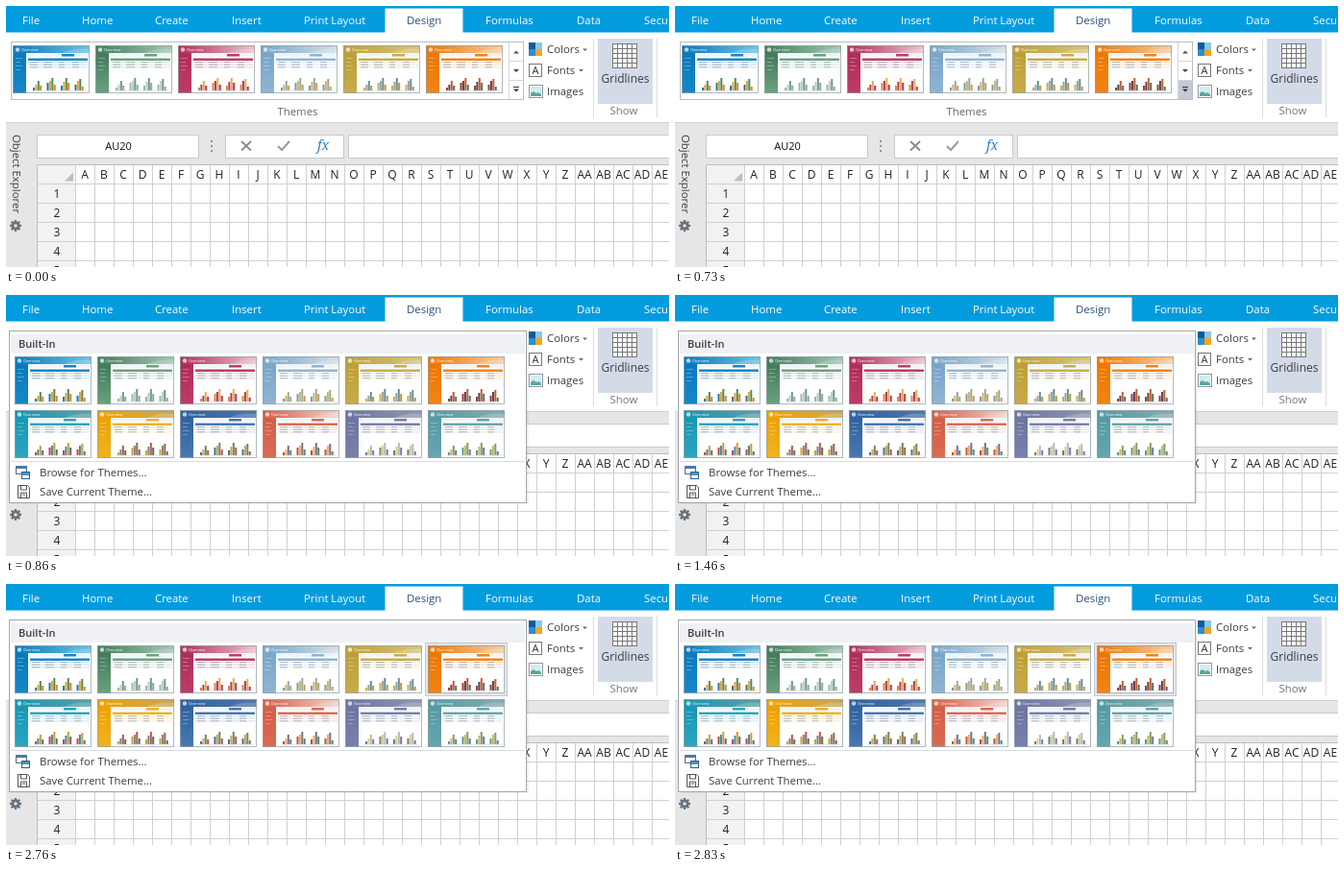
Recreate the animation shown at these times as an HTML page. Size 690 by 272 pixels, loop 3130 ms.

```html
<!DOCTYPE html>
<html lang="en">
<head>
<meta charset="utf-8">
<title>Theme gallery</title>
<style>
html, body { margin: 0; width: 100%; height: 100%; overflow: hidden; background: #fff; }
svg { display: block; width: 690px; height: 272px; }
text { font-family: "Open Sans", "Noto Sans", sans-serif; font-size: 11.4px; fill: #3c3c3c; white-space: pre; }
</style>
</head>
<body>
<svg id="stage" viewBox="0 0 690 272" xmlns="http://www.w3.org/2000/svg"></svg>
<script>
const LOOP = 3130, HOVER_AT = 700, OPEN_AT = 800, PICK_AT = 2760;
const LINE = '#c9c9c9', BLUE = '#039cde';

const range = n => Array.from({ length: n }, (_, i) => i);
const rect = (x, y, w, h, fill, more = '') =>
  `<rect x="${x}" y="${y}" width="${w}" height="${h}" fill="${fill}" ${more}/>`;
const box = (x, y, w, h, fill, stroke) =>
  rect(x + .5, y + .5, w - 1, h - 1, fill, `stroke="${stroke}"`);
const path = (d, stroke, width = 1, fill = 'none') =>
  `<path d="${d}" fill="${fill}" stroke="${stroke}" stroke-width="${width}"/>`;
const label = (x, y, str, more = '') => `<text x="${x}" y="${y}" ${more}>${str}</text>`;
const centred = (x, y, str, more = '') => label(x, y, str, 'text-anchor="middle" ' + more);
const down = (x, y, r, fill = '#444') =>
  path(`M${x - r} ${y}h${2 * r}l${-r} ${r}z`, 'none', 0, fill);

// dark, light, accent, then the four bar colours
const themes = [
  '#0879bd #6cc3e2 #1687c8 #1878b5 #f2a020 #3f8f6a #e68018',
  '#437b5b #a5c8b6 #6ba17f #9cb7a9 #c3ccc5 #6c9b7c #8fa898',
  '#b02c58 #ecc3d0 #bd3c69 #e08a2c #a83a78 #e5ad45 #c0304f',
  '#78a5c9 #d3dfe6 #8fb5d5 #719dbd #dfb34b #94a7b3 #c9a04a',
  '#bd9f34 #d8c57c #c9ac4b #d2ae43 #91a8a0 #678c9b #b99639',
  '#ee7600 #f9cda0 #f28416 #b0382f #3f4a5c #d2582c #4b7458',
  '#1598b5 #5f9fa6 #2da5bf #c8433c #2c8fb0 #e2942f #536f85',
  '#efa100 #c9a85a #f0b323 #db9e1d #638da1 #c3543c #54725c',
  '#2f62a0 #4f76a8 #4978b2 #3d70a9 #d4a43c #668a62 #b8574d',
  '#d75d45 #f2d5cc #db6a52 #c8483a #e3b554 #7a6aa0 #5c8b58',
  '#6c75a3 #9098b0 #7880ad #6a76a6 #e0cf70 #a5bdc6 #8a739b',
  '#549aa5 #86adae #67a6ad #5799a4 #d2b457 #829c6c #627c8c'
].map(s => s.split(' '));

const barSets = [[3, 6, 10, 5], [8, 10, 13, 6], [5, 9, 13, 8], [6, 10, 12, 4]];

function thumb(id, x, y) {
  const [, , accent, ...bars] = themes[id];
  const rows = range(3).map(i =>
    rect(16, 17 + i * 2.6, 62, 1.3, accent, 'opacity=".2"') +
    path(`M18 ${17.6 + i * 2.6}h8m6 0h9m7 0h6m8 0h7`, '#8f9ba5', .7)).join('');
  const menu = range(4).map(i =>
    path(`M3 ${13.5 + i * 4}h${7 - i % 2 * 2}`, '#fff', .6)).join('');
  const chart = barSets.map((set, g) => set.map((h, i) =>
    rect(21 + g * 14.5 + i * 2.4, 47 - h, 2, h, bars[i])).join('')).join('');
  return `<g transform="translate(${x} ${y})">` +
    rect(0, 0, 80, 50, '#fff') +
    rect(0, 0, 80, 8, `url(#head${id})`) +
    path('M52 8Q63 2 80 4V8z', 'none', 0, '#ffffff33') +
    rect(0, 8, 14, 42, `url(#side${id})`) +
    '<circle cx="5" cy="4.5" r="2.2" fill="#ffffffb0"/>' +
    label(9, 6, 'Overview', 'style="font-size:4px;fill:#fff"') +
    rect(14, 8, 66, 4, '#f0f4f6') + rect(51, 9, 13, 2.5, accent) +
    rect(16, 13.5, 62, 2.5, accent) +
    `<g opacity=".5">${menu}</g>` + rows + chart +
    path('M20 47.3H77', '#cfd4d7', .5) +
    rect(.5, .5, 79, 49, 'none', 'stroke="#93a0a7" stroke-opacity=".75"') + '</g>';
}

const gradients = () => '<defs>' + themes.map(([dark, light, accent], i) =>
  `<linearGradient id="head${i}"><stop stop-color="${dark}"/><stop offset="1" stop-color="${light}"/></linearGradient>` +
  `<linearGradient id="side${i}" x2="0" y2="1"><stop stop-color="${dark}"/><stop offset="1" stop-color="${accent}"/></linearGradient>`
).join('') + '</defs>';

function tabs() {
  const names = { File: 17, Home: 79, Create: 155, Insert: 235, 'Print Layout': 310,
    Design: 417, Formulas: 499, Data: 594, Security: 664 };
  return rect(0, 0, 690, 27.5, BLUE) + rect(394.5, 2.5, 81, 26, '#fff') +
    Object.entries(names).map(([name, x]) =>
      label(x, 19, name, `style="fill:${name === 'Design' ? '#2b4f78' : '#fff'}"`)).join('');
}

function gallery() {
  return box(5, 37, 534, 61, '#fff', '#b9bdc3') +
    range(6).map(i => thumb(i, 7 + i * 86, 41)).join('') +
    rect(523, 38, 15, 59, '#fff') +
    rect(524, 78, 14, 19, '#c5cad8', 'id="more"') +
    path('M523.5 38V97M523 57.5h15M523 77.5h15', '#d2d5da') +
    path('M528 49.5h6l-3 -3z', 'none', 0, '#555') + down(531, 66, 3) +
    path('M528 84.5h6', '#333') + down(531, 86.5, 3, '#333') +
    centred(303.5, 114, 'Themes', 'style="fill:#666"');
}

function tools() {
  const swatches = rect(544, 38, 7, 7, '#0f5c9c') + rect(551, 38, 7, 7, '#8cc6e8') +
    rect(544, 45, 7, 7, '#2a8fd0') + rect(551, 45, 7, 7, '#f4a51c');
  const picture = box(544, 82, 15, 14, '#fff', '#8b979f') + rect(546, 84, 11, 10, '#d3ecf3') +
    path('M546 94v-3l3-2 3 2 2-1 3 2v2z', 'none', 0, '#5aa79a');
  const grid = range(6).map(i =>
    `M${631.5 + i * 5} 39V65M631 ${39.5 + i * 5}h26`).join('');
  return swatches + box(544, 60, 14, 14, '#fff', '#777') +
    centred(551, 71, 'A', 'style="font-size:11px;fill:#333"') + picture +
    label(563, 49, 'Colors') + label(563, 71, 'Fonts') + label(563, 93, 'Images') +
    down(602.5, 44.5, 2.5, '#666') + down(598.5, 66, 2.5, '#666') +
    path('M611.5 34V116M677.5 34V116', '#dcdcdc') +
    rect(616, 34, 57, 68, '#d3dbe9') + rect(631, 39, 26, 26, '#fff') + path(grid, '#777') +
    centred(644.5, 79.5, 'Gridlines', 'style="font-size:12px"') +
    centred(643, 113, 'Show', 'style="fill:#777"');
}

function formulaBar() {
  return rect(0, 121, 690, 151, '#e6e6e6') + path('M0 121.5H690', '#d0d0d0') +
    box(32, 134, 169, 25, '#fff', LINE) + box(228, 134, 124, 25, '#fff', LINE) +
    box(356, 134, 340, 25, '#fff', LINE) +
    centred(117, 150, 'AU20', 'style="font-size:11px;fill:#111"') +
    range(3).map(i => rect(213, 140 + i * 5, 2, 2, '#929292')).join('') +
    path('M245 141l10 9.5M255 141l-10 9.5', '#8a8a8a', 1.8) +
    path('M283 146l4 4 8-9', '#9a9a9a', 2) +
    label(324, 150, 'fx', 'style="font:italic 14px \'Noto Serif\',serif;fill:#2d7fc0"');
}

function sideBar() {
  const teeth = range(8).map(i => `<rect x="-1.2" y="-6" width="2.4" height="4" transform="rotate(${i * 45})"/>`).join('');
  return `<text transform="translate(6.5 134) rotate(90)">Object Explorer</text>` +
    `<g transform="translate(10 229)" fill="#66727c">${teeth}<circle r="4.4"/><circle r="1.8" fill="#e6e6e6"/></g>`;
}

function sheet() {
  const cols = range(31).map(i => 72.5 + i * 20), rows = range(5).map(i => 185.5 + i * 20);
  const letter = i => (i < 26 ? '' : 'A') + String.fromCharCode(65 + i % 26);
  return rect(32, 165, 658, 107, '#fff') + rect(32, 165, 40, 107, '#f1f2f4') +
    path(cols.map(x => `M${x} 165V272`).join('') + rows.map(y => `M32 ${y}H690`).join(''), '#d0d0d0') +
    path('M32.5 272V165.5H690', '#bdbdbd') +
    path('M61 182.5h9v-9z', 'none', 0, '#bfbfbf') +
    range(31).map(i => centred(82 + i * 20, 180, letter(i), 'style="font-size:12px;fill:#222"')).join('') +
    range(5).map(i => centred(53, 200 + i * 20, i + 1, 'style="font-size:12px;fill:#222"')).join('');
}

function panel() {
  const shadow = range(3).map(i =>
    rect(5, 39, 537 + i, 177 + i, '#000', 'opacity=".04"')).join('');
  const browse = box(10, 178, 12, 9, '#fff', '#666') + rect(10, 178, 12, 3, '#477ba8') +
    box(16, 184, 9, 8, '#fff', '#315f89') + rect(17, 185, 7, 3, '#4496cf');
  const save = path('M12.5 198.5h10l2 2v11h-12z', '#555', 1, '#fff') +
    path('M15.5 199v4h6v-4M15.5 211v-5h6v5M17 208h3', '#555');
  return `<g id="panel">${shadow}` + box(3, 37, 539, 180, '#fff', '#a3a7ad') +
    rect(5, 41, 535, 20, '#eff1f4') +
    label(13, 55, 'Built-In', 'style="font-size:11px;font-weight:600"') +
    rect(436.5, 61.5, 85, 55, '#e3e6eb', 'id="pick" stroke="#c3c8d0"') +
    range(12).map(i => thumb(i, 9 + i % 6 * 86, 64 + Math.floor(i / 6) * 56)).join('') +
    path('M5 173.5H540', '#d9dce0') + browse + save +
    label(35, 189, 'Browse for Themes...') + label(35, 209, 'Save Current Theme...') + '</g>';
}

const stage = document.getElementById('stage');
stage.innerHTML = gradients() + rect(0, 0, 690, 272, '#fff') + tabs() + gallery() + tools() +
  formulaBar() + sideBar() + sheet() + panel();

const show = (id, on) =>
  document.getElementById(id).setAttribute('display', on ? 'inline' : 'none');
const start = performance.now();

function draw(now) {
  const t = Math.max(0, now - start) % LOOP;
  show('more', t >= HOVER_AT);
  show('panel', t >= OPEN_AT);
  show('pick', t >= PICK_AT);
  requestAnimationFrame(draw);
}
draw(start);
</script>
</body>
</html>
```
